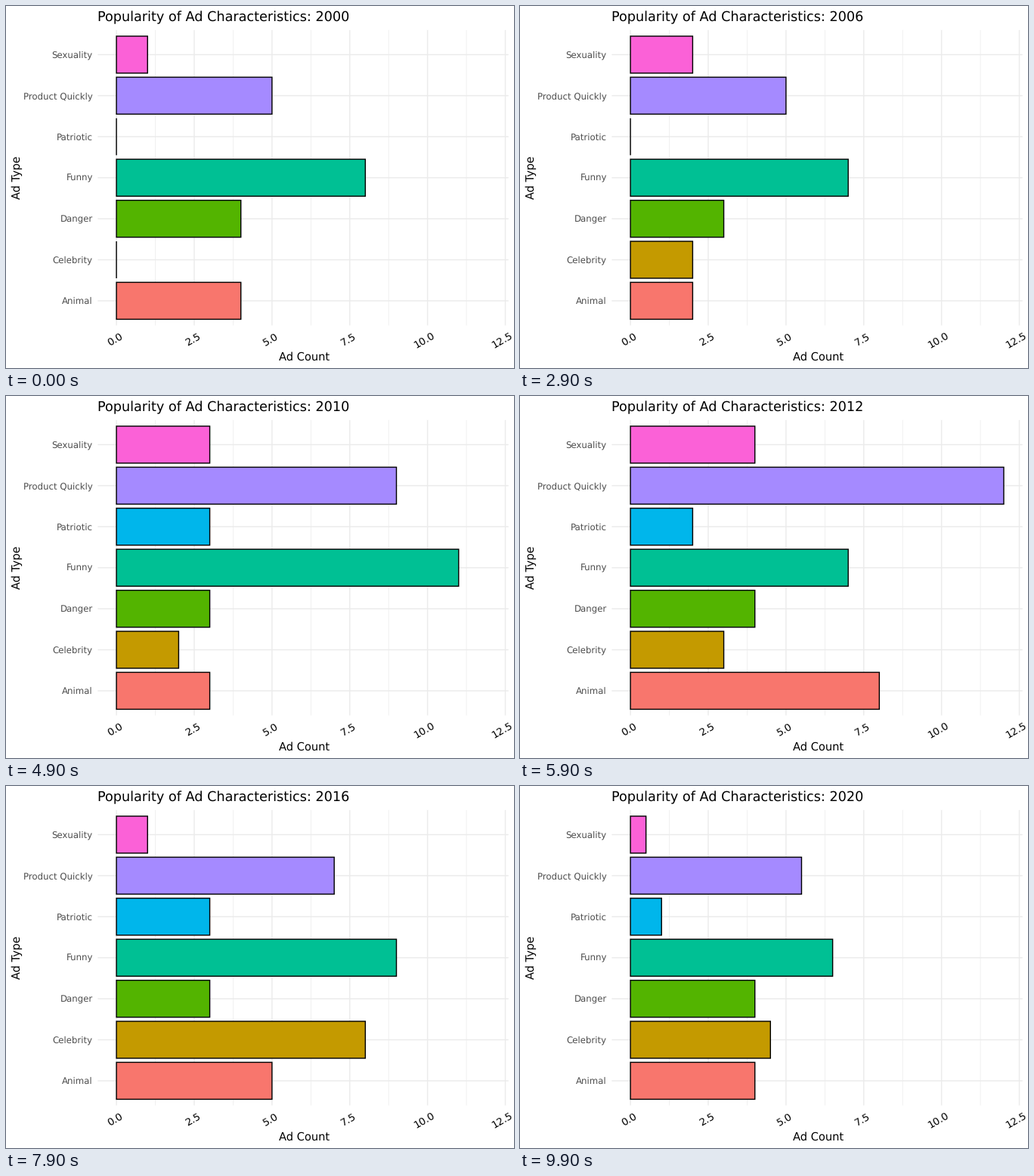
These frames come from a looping animation (672x480 px, 10 s). A matplotlib script:

```python
import matplotlib.pyplot as plt
from matplotlib.animation import FuncAnimation
from matplotlib.patches import Rectangle

W, H, DPI = 672, 480, 96
LEFT, RIGHT, TOP, BOTTOM = 121.4, 664.7, 31.9, 423.5
X0, UNIT = 146.1, 41.153          # zero position and pixels per ad
Y0, STEP, BAR = 64.5, 54.4, 49    # first row centre, row pitch, bar height
LINE = 1.42 * 72 / DPI
GRID = "#EBEBEB"

# One row per ad type, one value per year from 2000 to 2020
ADS = {
    "Sexuality": ("#FB61D7", [1, 3, 4, 4, 4, 5, 2, 3, 4, 5, 3, 4, 4, 5, 1, 2, 1, 0, 2, 1, 0]),
    "Product Quickly": ("#A58AFF", [5, 8, 7, 8, 7, 8, 5, 8, 9, 10, 9, 8, 12, 12, 9, 8, 7, 7, 10, 11, 6]),
    "Patriotic": ("#00B6EB", [0, 0, 0, 0, 1, 0, 0, 2, 2, 2, 3, 0, 2, 1, 3, 4, 3, 4, 5, 4, 2]),
    "Funny": ("#00C094", [8, 10, 9, 11, 10, 11, 7, 11, 10, 12, 11, 9, 7, 10, 7, 6, 9, 6, 5, 6, 5]),
    "Danger": ("#53B400", [4, 5, 4, 3, 4, 4, 3, 5, 4, 6, 3, 4, 4, 5, 2, 3, 3, 3, 3, 3, 4]),
    "Celebrity": ("#C49A00", [0, 3, 2, 0, 2, 1, 2, 3, 2, 3, 2, 3, 3, 4, 4, 6, 8, 6, 7, 6, 9]),
    "Animal": ("#F8766D", [4, 5, 5, 5, 6, 5, 2, 6, 5, 7, 3, 6, 8, 8, 5, 4, 5, 3, 2, 4, 4]),
}
YEARS = 21
# Each year ends in a single in-between frame
HALFWAY = [*range(3, 84, 5), *range(87, 100, 4)]

plt.rcParams.update({"font.family": "DejaVu Sans", "text.hinting": "none"})
fig = plt.figure(figsize=(W / DPI, H / DPI), dpi=DPI, facecolor="white")
ax = fig.add_axes([0, 0, 1, 1])
ax.set_xlim(0, W)
ax.set_ylim(H, 0)
ax.axis("off")


def label(x, y, text, size, color="black", ha="left", angle=0):
    return ax.text(x, y, text, fontsize=size, color=color, ha=ha,
                   va="baseline", rotation=angle, rotation_mode="anchor")


def grid_line(xs, ys, width):
    ax.plot(xs, ys, color=GRID, lw=width, solid_capstyle="butt",
            snap=False, zorder=1)


def draw_axes():
    for i in range(5):
        x = X0 + (1.25 + 2.5 * i) * UNIT
        grid_line([x, x], [TOP, BOTTOM], LINE / 2)
    for i in range(len(ADS)):
        y = Y0 + i * STEP
        grid_line([LEFT, RIGHT], [y, y], LINE)
    for i in range(6):
        x = X0 + 2.5 * i * UNIT
        grid_line([x, x], [TOP, BOTTOM], LINE)
        text = f"{2.5 * i:.1f}"
        n = len(text)
        label(x + 5.4 - 1.85 * n, 443 + 0.85 * n, text, 10, ha="center", angle=30)
    label(395, 469.7, "Ad Count", 11, ha="center")
    label(18.5, 227.7, "Ad Type", 11, ha="center", angle=90)


def draw_bars():
    bars = []
    for i, (name, (color, _)) in enumerate(ADS.items()):
        y = Y0 + i * STEP
        label(114.8, y + 4.3, name, 8.8, "#4D4D4D", ha="right")
        bar = Rectangle((X0, y - BAR / 2), 0, BAR, facecolor=color,
                        edgecolor="black", lw=LINE, joinstyle="miter",
                        snap=False, zorder=2)
        bars.append(ax.add_patch(bar))
    return bars


draw_axes()
bars = draw_bars()
title = label(LEFT, 20, "", 13.2)


def update(frame):
    year = sum(h < frame for h in HALFWAY)
    mix = 0.5 if frame in HALFWAY else 0
    for bar, (_, counts) in zip(bars, ADS.values()):
        now, after = counts[year], counts[(year + 1) % YEARS]
        bar.set_width((now + (after - now) * mix) * UNIT)
    title.set_text(f"Popularity of Ad Characteristics: {2000 + year}")
    return [*bars, title]


anim = FuncAnimation(fig, update, frames=100, interval=100,
                     repeat=True, repeat_delay=0, blit=False)
plt.show()
```
